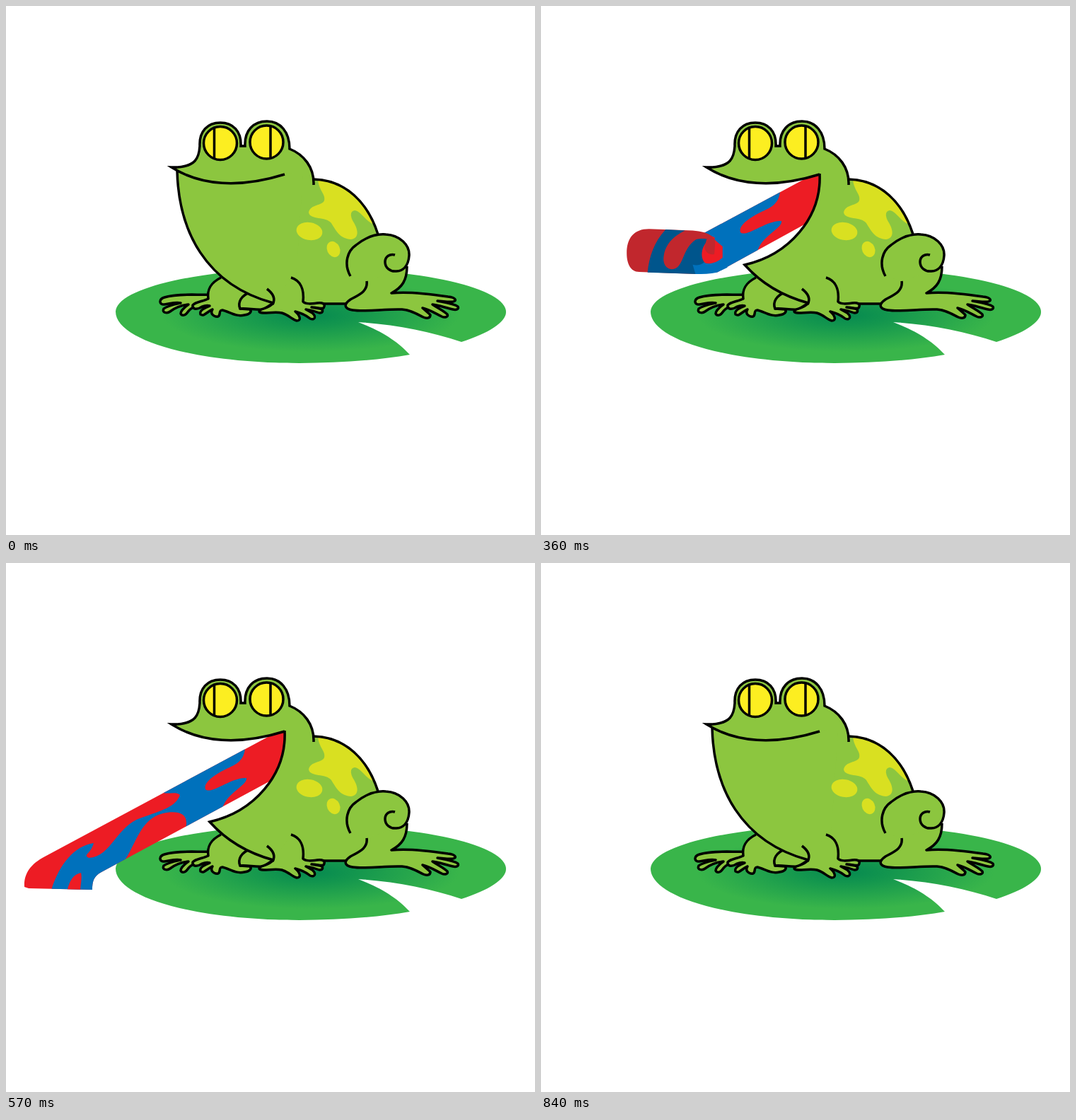
An HTML page for the animation above (1.2 s loop, 748 by 748 pixels).

```html
<!DOCTYPE html>
<html lang="en">
<head>
<meta charset="utf-8">
<title>Frog</title>
<style>
  html, body { margin: 0; width: 100%; height: 100%; overflow: hidden; background: #fff; }
  svg { display: block; width: 100vw; height: 100vh; }
  .skin { fill: #8cc63f; }
  .ink { stroke: #000; stroke-width: 3.5; stroke-linecap: butt; stroke-linejoin: round; }
  .line { fill: none; }
  .spot { fill: #d9e021; }
  .eye { fill: #fcee21; }
  .red { fill: #ed1c24; }
  .blue { fill: #0071bc; }
  .dred { fill: #c1272d; }
  .dblue { fill: #00558c; }
</style>
</head>
<body>
<svg viewBox="0 0 748 748">
  <defs>
    <radialGradient id="shade" gradientUnits="userSpaceOnUse" cx="0" cy="0" r="1"
      gradientTransform="translate(431 437) scale(210 52)">
      <stop offset="0" stop-color="#068a50"/>
      <stop offset=".3" stop-color="#13964e"/>
      <stop offset="1" stop-color="#39b54a"/>
    </radialGradient>
    <clipPath id="cut"><path id="edge"/></clipPath>
  </defs>

  <path fill="url(#shade)" d="M155 432A276 62 0 0 1 707 433C707 447 682 463 644 475C600 460 548 450 498 447C534 461 554 475 571 493C525 501 470 505 415 505C268 505 155 473 155 432Z"/>

  <g id="tongue">
    <g clip-path="url(#cut)">
      <rect class="red" y="225" width="420" height="245"/>
      <path class="blue" d="M338 262C336 284 320 286 304 295C290 303 279 312 282 320C290 328 320 302 340 304C342 314 312 325 306 347L254 375C260 352 240 350 222 354C190 362 185 395 167 422L135 440L130 470L62 470C72 430 95 400 124 396C120 412 108 412 117 417C150 415 155 372 192 360C220 350 240 345 246 328C240 323 232 327 222 325Z"/>
      <path class="red" d="M86 466C90 445 98 440 106 438C108 446 105 455 105 466Z"/>
    </g>
    <g id="roll">
      <path class="dred" d="M207 268L270 271C295 274 304 282 302 300L288 332L275 350L193 346C180 346 175 330 175 312C175 285 185 268 207 268Z"/>
      <path class="dblue" d="M231 269L259 271C236 285 228 304 228 325C229 338 236 342 242 341C258 337 254 304 275 287C284 285 290 286 294 288L288 332L276 350L205 347C207 320 214 292 231 269Z"/>
      <path class="blue" d="M270 333C280 336 288 330 292 320L312 318L320 338L305 347C295 350 285 350 274 350Z"/>
      <path class="red" d="M294 288C283 296 279 320 288 330C297 333 306 328 313 320L313 300L302 288Z"/>
      <path class="dred" d="M290 287L301 285C303 292 302 302 301 314C294 316 288 311 287 301Z"/>
    </g>
  </g>

  <!-- far feet and arm -->
  <g class="skin ink">
    <path d="M290 408C270 409 245 406 224 412C215 415 217 423 224 422C232 421 240 418 247 420C238 422 228 424 223 428C220 434 228 435 232 432C240 426 248 423 258 422C251 427 247 431 247 435C249 439 254 437 256 434C260 428 268 421 290 418"/>
    <path d="M304 384C290 391 284 400 286 414C278 418 268 418 264 423C263 429 269 429 274 427C278 424 284 423 288 424C280 427 273 431 275 436C280 440 284 432 292 429C288 435 294 440 300 439C304 437 300 430 306 430C315 432 325 440 337 437C345 436 348 432 345 429L331 428L345 405"/>
    <path d="M345 405C333 409 327 419 331 428C342 427 352 430 364 429L378 420"/>
  </g>

  <path class="skin" d="M234 228C270 229 273 213 274 198C273 177 285 165 303 165C321 165 333 177 332 198L338 198C337 176 350 163 369 163C388 163 401 178 401 202C420 210 433 222 435 245C480 246 512 278 526 323L520 400L482 421L378 420C339.6 409.6 310.5 391.2 288 366C350 352 397 300 394 238C330 258 275 254 234 228Z"/>
  <path id="throat" class="skin" d="M242 233C244 318 282 394 378 420L410 385L420 238L394 236C330 256 275 252 242 233Z"/>

  <path class="spot" d="M441 246C443 262 452 266 450 275C447 283 430 280 428 292C430 303 452 297 460 307C468 320 473 329 488 330C501 328 497 314 491 305C486 296 487 290 493 289C502 290 508 304 519 308C505 270 478 248 441 246Z"/>
  <ellipse class="spot" cx="429" cy="318.5" rx="18.5" ry="12.5" transform="rotate(10 429 318.5)"/>
  <ellipse class="spot" cx="463" cy="344" rx="9" ry="11.5" transform="rotate(-25 463 344)"/>

  <g class="ink line">
    <path d="M435 253C436 228 421 210 401 202C401 178 388 163 369 163C350 163 337 176 338 198L332 198C333 177 321 165 303 165C285 165 273 177 274 198C273 213 270 229 234 228C275 254 330 258 394 238" stroke-linejoin="miter"/>
    <path d="M435 245C480 246 512 278 526 323M446 421L484 421"/>
    <path id="chest" d="M242 233C244 318 282 394 378 420"/>
    <path id="mouth" stroke-linejoin="miter" d="M394 237C397 300 350 352 288 366C310.5 391.2 339.6 409.6 378 420"/>
  </g>

  <g class="ink">
    <circle class="eye" cx="303" cy="194" r="23.5"/>
    <circle class="eye" cx="368.5" cy="192.5" r="23.5"/>
    <path d="M294.5 172V216M374 169V215"/>
  </g>

  <!-- hind leg -->
  <path class="skin" d="M487 382C477 364 483 346 495 338C510 326 525 322 537 323C557 324 571 338 570 353L567 370C567 388 560 398 545 406L520 425L482 420L510 389Z"/>
  <path class="skin ink" d="M567 368C567 388 560 398 545 406C570 403 605 408 625 411C636 412 638 417 632 418C625 419 617 417 610 417C620 419 634 421 639 425C641 429 636 430 632 429C622 427 612 423 603 422C612 428 620 432 624 436C626 440 620 441 616 439C606 434 598 429 589 427C592 430 598 434 600 437C600 442 594 442 590 440C580 435 572 430 560 429C535 428 510 433 490 430C478 428 477 422 487 415C500 408 512 403 510 389"/>
  <path class="ink line" d="M487 382C477 364 483 346 495 338C510 326 525 322 537 323C557 324 571 338 570 353C569 367 562 375 552 375C543 376 536 370 536 362C536 354 543 350 550 352"/>

  <!-- near arm -->
  <path class="skin ink" d="M378 420C372 428 358 428 358 432C361 437 378 431 390 434C400 437 404 443 411 445C418 445 416 438 409 432C417 434 424 437 430 442C437 445 439 439 433 434L424 429C432 430 438 432 443 434C449 434 449 429 444 428L432 426C440 426 446 429 449 427C453 421 447 419 440 420C432 421 424 422 420 418C422 400 416 388 403 384"/>
  <path class="ink line" d="M369 400C377 406 382 413 377 422"/>
</svg>
<script>
const LOOP = 1200;
const el = id => document.getElementById(id);
const mix = (a, b, k) => a + (b - a) * k;

// Held poses: roll = how far the tongue has travelled, tip = bottom of the hanging end
const poses = [
  { at: 0, shut: true },
  { at: 210 },
  { at: 240, roll: -0.3, size: 0.8 },
  { at: 300, roll: 0 },
  { at: 360, roll: 0.33 },
  { at: 390, roll: 0.67 },
  { at: 420, roll: 1 },
  { at: 450, tip: 457 },
  { at: 480, tip: 460 },
  { at: 540, tip: 458 },
  { at: 570, tip: 460 },
  { at: 600, roll: 1 },
  { at: 630, roll: 0.67 },
  { at: 660, roll: 0.33 },
  { at: 720, roll: 0 },
  { at: 780, roll: -0.3, size: 0.8 },
  { at: 840, shut: true }
];

const show = (id, on) => { el(id).style.display = on ? '' : 'none'; };

function placeRoll(p, size = 1) {
  const x = mix(305, 135, p), y = mix(347, 437, p);
  const sx = mix(1, 0.946, p) * size;
  const sy = mix(1, 0.33, p) * (size < 1 ? size * 0.9 : 1);
  el('roll').setAttribute('transform',
    `translate(${x} ${y}) scale(${sx} ${sy}) translate(-305 -347)`);
  el('edge').setAttribute('d',
    `M400 230L${mix(303, 65, p)} ${mix(282, 410, p)}L${x} ${y}L385 302Z`);
}

function hangTip(y) {
  el('edge').setAttribute('d',
    `M400 230L55 415C34 426 25 440 26 ${y - 2}L32 ${y}L122 ${y + 2}C122 450 124 443 135 437L385 302Z`);
}

function draw(pose) {
  const rolled = pose.roll !== undefined;
  show('throat', pose.shut);
  show('chest', pose.shut);
  show('mouth', !pose.shut);
  show('tongue', rolled || pose.tip);
  show('roll', rolled);
  if (rolled) placeRoll(pose.roll, pose.size);
  else if (pose.tip) hangTip(pose.tip);
}

let current;
function tick(now) {
  const t = now % LOOP;
  const pose = poses.filter(p => p.at <= t).pop();
  if (pose !== current) draw(current = pose);
  requestAnimationFrame(tick);
}
draw(current = poses[0]);
requestAnimationFrame(tick);
</script>
</body>
</html>
```
